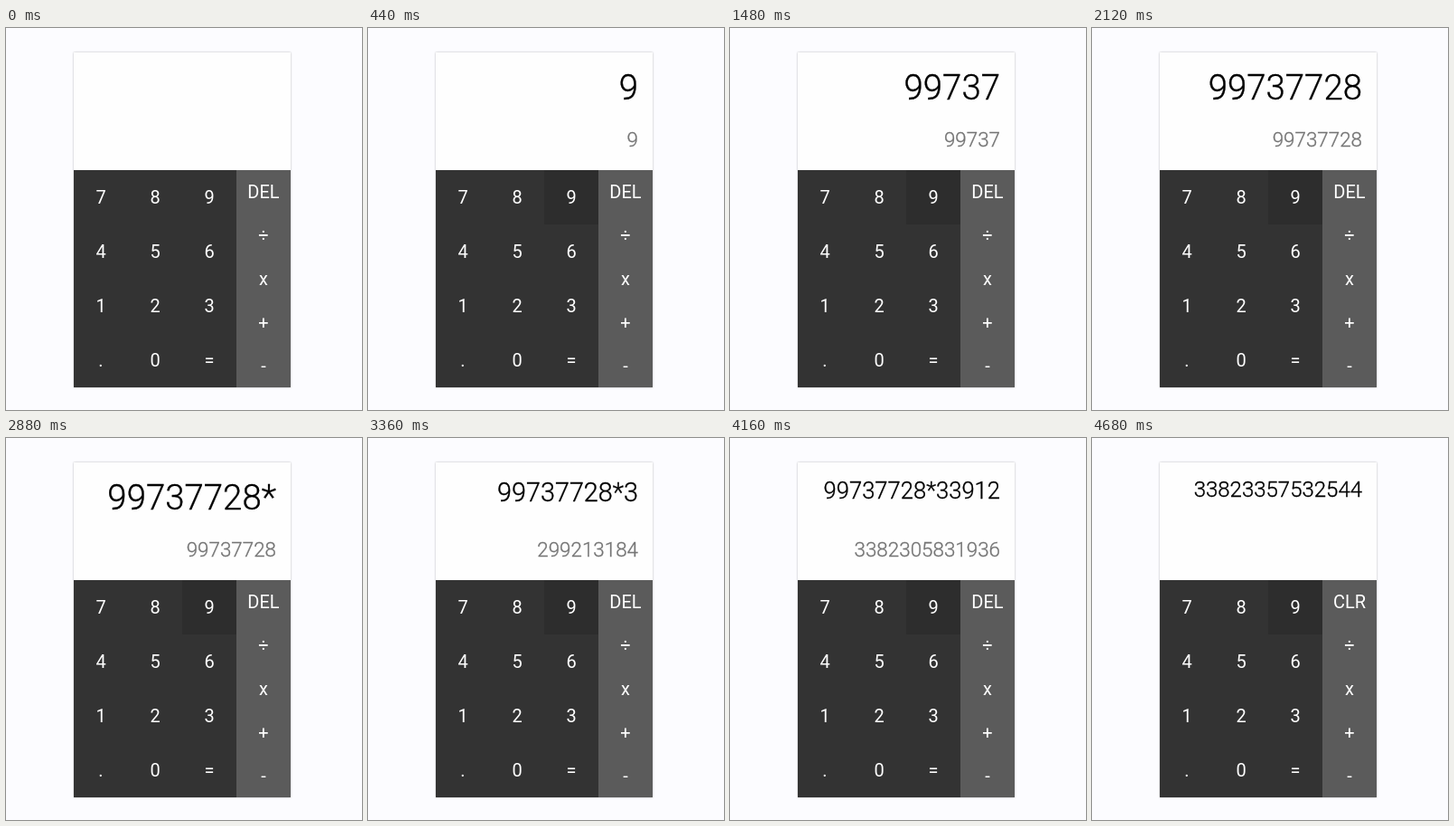
Write an HTML page that moves like this. It is 394 by 422 pixels and loops after 4720 ms.

```html
<!DOCTYPE html>
<html lang="en">
<head>
<meta charset="utf-8">
<title>Calculator</title>
<style>
  html, body { margin: 0; width: 100%; height: 100%; overflow: hidden; background: #fcfcff; }
  svg { display: block; width: 394px; height: 422px; font-family: Roboto, sans-serif; }
  .card { fill: #fefefe; filter: drop-shadow(0 0.5px 1.2px rgba(0, 0, 0, 0.28)); }
  .key { font-size: 20px; fill: #fff; text-anchor: middle; }
  .line { font-weight: 300; text-anchor: end; stroke-width: 0.35px; }
</style>
</head>
<body>
<svg viewBox="0 0 394 422">
  <rect class="card" x="75" y="27" width="240" height="370"/>
  <rect x="75" y="157" width="180" height="240" fill="#333"/>
  <rect x="255" y="157" width="60" height="240" fill="#5b5b5b"/>
  <rect id="focus" x="195" y="157" width="60" height="60" fill="#2d2d2d"/>
  <g id="keys"></g>
  <text id="formula" class="line" x="299" fill="#000" stroke="#000"></text>
  <text id="preview" class="line" x="299"></text>
</svg>
<script>
const LOOP = 4720;
const INPUT = '99737728*339123';
const PRESS = [280, 520, 760, 1040, 1280, 1520, 1760, 2000, 2480,
               3160, 3400, 3560, 3720, 3925, 4200];
const EQUALS = 4440, LIFT = 200, SHRINK = 120;
const TOP = 43, ASCENT = 0.927;
const PREVIEW = { y: 131, size: 22.4, grey: 117 };
// font size once the input has this many characters
const SIZES = [[0, 38.4], [10, 28.8], [14, 25.6], [15, 24]];

const get = id => document.getElementById(id);
const focusBox = get('focus'), formula = get('formula'), preview = get('preview');
const clamp = v => Math.min(1, Math.max(0, v));
const easeOut = p => 1 - (1 - clamp(p)) ** 3;
const mix = (a, b, p) => a + (b - a) * p;

function addKey(label, x, y) {
  const t = document.createElementNS('http://www.w3.org/2000/svg', 'text');
  t.setAttribute('class', 'key');
  t.setAttribute('x', x);
  t.setAttribute('y', y + 7);
  t.textContent = label;
  get('keys').append(t);
  return t;
}

[...'789456123.0='].forEach((c, i) =>
  addKey(c, 105 + 60 * (i % 3), 187 + 60 * Math.floor(i / 3)));
const [clearKey] = ['DEL', '÷', 'x', '+', '-'].map((c, i) => addKey(c, 285, 181 + 48 * i));

function place(el, text, y, size, alpha = 1) {
  el.textContent = text;
  el.setAttribute('y', y);
  el.setAttribute('font-size', size);
  el.setAttribute('opacity', alpha);
}

function sizeAt(t) {
  let size = SIZES[0][1];
  for (const [count, next] of SIZES.slice(1)) {
    size = mix(size, next, easeOut((t - PRESS[count - 1]) / SHRINK));
  }
  return size;
}

function evaluate(text) {
  if (!text) return '';
  return String(text.split('*').filter(Boolean).map(Number).reduce((a, b) => a * b));
}

function draw(t) {
  const typed = INPUT.slice(0, PRESS.filter(p => p <= t).length);
  const size = sizeAt(t);
  const base = TOP + ASCENT * size;
  const lift = easeOut((t - EQUALS) / LIFT);
  const grey = Math.round(mix(PREVIEW.grey, 0, lift));
  const color = `rgb(${grey}, ${grey}, ${grey})`;

  focusBox.setAttribute('visibility', typed ? 'visible' : 'hidden');
  clearKey.textContent = t >= EQUALS ? 'CLR' : 'DEL';
  place(formula, typed, base - 10 * lift, size, 1 - lift);
  place(preview, evaluate(typed), mix(PREVIEW.y, base, lift), mix(PREVIEW.size, size, lift));
  preview.setAttribute('fill', color);
  preview.setAttribute('stroke', color);
}

const start = performance.now();
function tick() {
  draw((performance.now() - start) % LOOP);
  requestAnimationFrame(tick);
}
tick();
</script>
</body>
</html>
```
